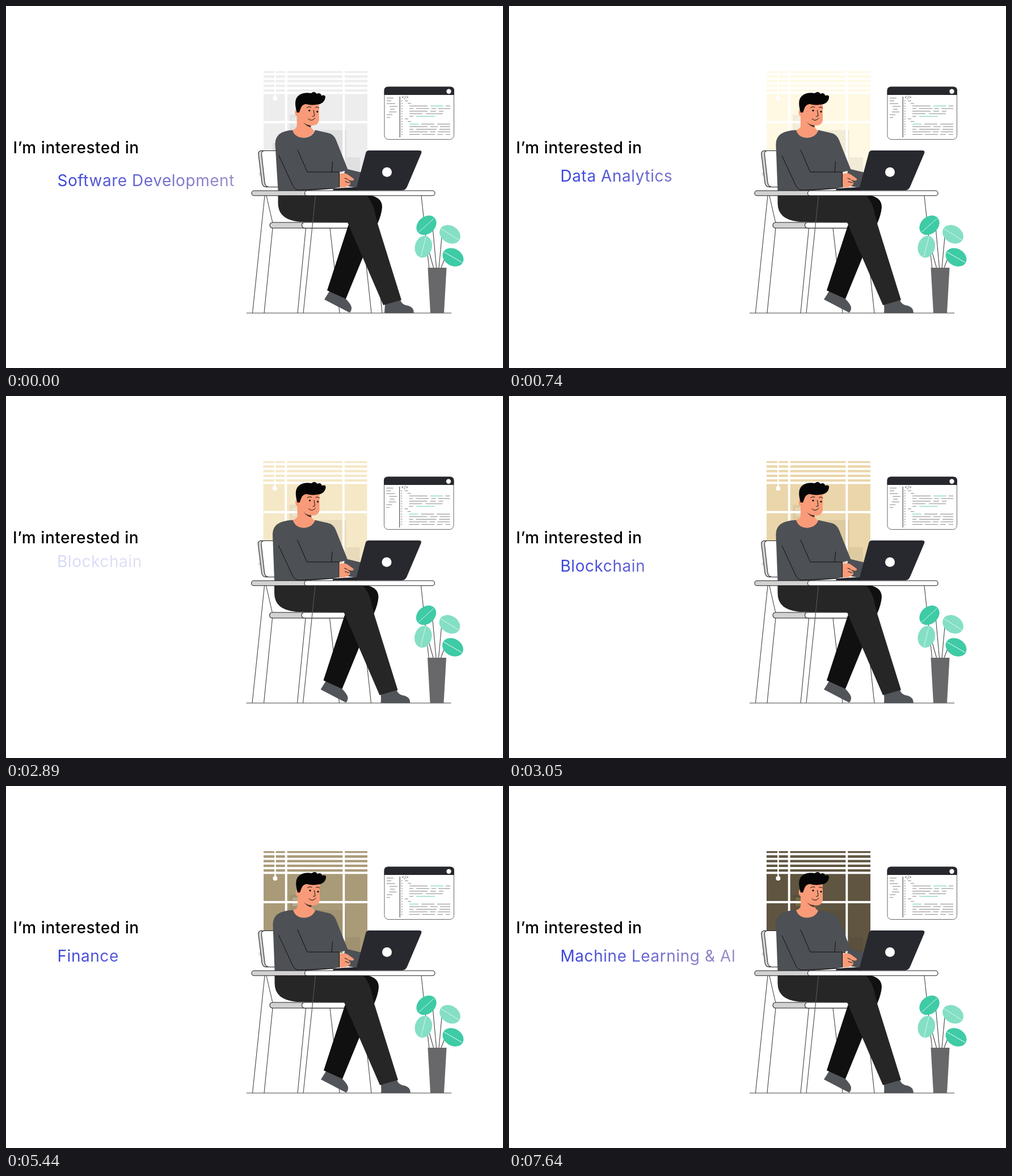
These frames come from a looping animation (876x639 px, 8000 ms). An HTML page:

```html
<!DOCTYPE html>
<html lang="en">
<head>
<meta charset="utf-8">
<title>Interests</title>
<style>
html, body { margin: 0; width: 100%; height: 100%; overflow: hidden; background: #fff }
svg { display: block; width: 876px; height: 639px }
text { font-family: Inter, "Open Sans", sans-serif; font-size: 28px; letter-spacing: .55px }
.line { fill: none; stroke: #444; stroke-width: 1.1 }
.thin { fill: none; stroke: #111; stroke-width: 1; stroke-linecap: round; stroke-linejoin: round }
.box { stroke: #222; stroke-width: 1.1 }
</style>
</head>
<body>
<svg viewBox="0 0 876 639">
<defs>
  <linearGradient id="ink" gradientUnits="userSpaceOnUse" x1="91" x2="404" y1="0" y2="0">
    <stop stop-color="#3944dc"/><stop offset="1" stop-color="#9d90c6"/>
  </linearGradient>
</defs>
<g id="stage">
  <text x="12.500" y="260.300" font-weight="500">I’m interested in</text>
  <g fill="url(#ink)"><text id="old" x="90.500"/><text id="next" x="90.500"/></g>

  <!-- window -->
  <rect x="445.500" y="294" width="4" height="5" fill="#ddd"/>
  <rect id="pane" x="454" y="115" width="183" height="180"/>
  <path opacity=".055" d="M500 192h16v27h84v76h-100zM600 267h24v28h-24zM470 242h24v50h-24z"/>
  <path id="lit" d="M505 197h12v5h-12zM505 207h12v5h-12z"/>
  <path fill="none" stroke="#fff" stroke-width="3.900" d="M454 120.200h183m-183 8.400h183m-183 8.200h183m-183 8.200h183M454 153.300h183M454 205h183M493.700 115v180M595.300 115v180"/>
  <path fill="none" stroke="#fff" stroke-width="2.500" d="M474.400 115v47"/>
  <circle cx="474.400" cy="163" r="4" fill="#fff"/>

  <!-- code panel -->
  <rect x="667" y="143" width="122.500" height="92.500" rx="7" fill="#fff" stroke="#666"/>
  <path fill="#27282d" d="M666.500 157v-8q0-6.500 6.500-6.500h110.500q6.500 0 6.500 6.500v8z"/>
  <circle cx="780.500" cy="150.700" r="4.200" fill="#fff"/>
  <path class="line" d="M694.200 160v72"/>
  <text x="697" y="164" style="font-size:7.500px;letter-spacing:0" fill="#444">&lt;/&gt;</text>
  <g id="code" fill="none" stroke-width=".8"></g>

  <!-- floor and chair -->
  <path class="line" d="M424 542H785M456 335L434.500 542M459 335L470 383M470 392L455 542M528.500 392L514 542M571 392L588 542M628 392L644 542M652 430L663 542M732 335L746 465"/>
  <path class="box" fill="#d2d2d2" d="M458 255.500H449q-5 1-4 7l6 49q1 8 8 8h10z"/>
  <path class="box" fill="#fff" d="M482 255.500H455q-5 0-4.500 7l5.500 49q1 8 8 8h18z"/>
  <rect class="box" x="465" y="382" width="160" height="10" rx="5" fill="#d2d2d2"/>
  <rect class="box" x="521.500" y="382" width="110" height="10" rx="5" fill="#fff"/>

  <g id="legs">
    <path fill="#515458" d="M565 502L592 516Q604 528 603 534Q602 541 599 541L555 518Z"/>
    <path fill="#515458" d="M662 526L689 519Q692 528 703 529Q713 532 713 542H661Z"/>
    <path fill="#101010" d="M630 335H640Q657 340 657 355Q656 368 649 384L622 446 593 517 560 502 597 388Z"/>
    <path fill="#262626" d="M473.500 334H629Q641 346 645 368L649 384 691 519 659 528 596 382 513 381Q473.500 378 473.500 348Z"/>
  </g>
  <path fill="none" stroke="#555" stroke-width="1.200" d="M545.500 335L524 542"/>

  <!-- body -->
  <path fill="#4d5055" d="M598 287L627 294 618 321 592 316Z"/>
  <path id="torso" fill="#4d5055"/>
  <path class="thin" d="M481 264L505 316Q508 323 515 325L577 322M514 254L531 293H587.500V320M575.500 275L574 293"/>
  <g id="head">
    <path fill="#f99b78" d="M514 190V212Q513 217 506 219Q510 232 525 232.500Q540 232 545 220Q539 217 538 209Z"/>
    <path fill="#49312d" d="M525 205Q531 211 539 210L538 214Q530 212 525 205Z"/>
    <path fill="#f99b78" d="M518 174L553 170V202Q551 211 541 211Q526 210 519 196Q511 196 510.500 188Q511 180 518 182Z"/>
    <path fill="#050505" d="M514 188Q508 168 515 160Q523 151 539 154Q545 149 549 155Q556 152 557 158Q565 156 564 162Q562 173 549 174Q539 176 530 173Q523 174 521 180L518 188Z"/>
    <circle cx="536" cy="184.500" r="1.500"/><circle cx="550" cy="186.500" r="1.500"/>
    <path class="thin" d="M531.500 179.500Q535 176.500 539 178.500M546.500 179Q550 177 553 180M543.500 184L545 194 541.500 195M534 199Q540 205 546 198"/>
  </g>

  <!-- table, laptop, hand -->
  <rect class="box" x="433" y="326" width="110" height="8.800" rx="4.400" fill="#d2d2d2"/>
  <rect class="box" x="526.500" y="326" width="229.500" height="8.800" rx="4.400" fill="#fff"/>
  <path fill="#222328" d="M577 322.500Q597 320 620 320V325.500H576Z"/>
  <path fill="#f99b78" d="M588 296Q597 294 602 297L613 305Q614 309 608 308L602 306 606 310Q609 315 604 317Q598 321 588 320Z"/>
  <path class="thin" stroke-width=".7" d="M602 306L597 304M605 312L598 310"/>
  <path fill="#28292f" d="M640 255H728Q734 255 732 260L707 319Q704 325.500 698 325.500H616.500L634 260Q635 255 640 255Z"/>
  <circle cx="671.500" cy="293.300" r="8.500" fill="#fff"/>

  <!-- plant -->
  <path class="line" d="M763 463L768 408M758.500 462L752.500 395M753.500 462L746 435M767 462L773 446"/>
  <path fill="#68686a" d="M743.500 462H776.500L772 542H748Z"/>
  <g id="leaves"></g>
</g>
</svg>
<script>
const $ = id => document.getElementById(id);
const words = ["Software Development", "Data Analytics", "Blockchain", "Finance", "Machine Learning & AI"];
const tints = [[237, 237, 237], [255, 249, 227], [234, 214, 170], [169, 154, 120], [95, 85, 65]];
const changes = [
  [500, 580, 660, 740],
  [2740, 2810, 2890, 2970, 3050],
  [5040, 5120, 5200, 5280, 5440],
  [7340, 7410, 7490, 7570, 7640]
];
const clamp = v => Math.max(0, Math.min(1, v));

// code rows: each pair is a dash and the gap after it; G marks green
const dark = [], green = [];
const row = (x, y, spec) => spec.split(" ").forEach(part => {
  const [len, gap] = part.replace("G", "").split(",");
  (part[0] === "G" ? green : dark).push(`M${x} ${y}h${len}`);
  x += +len + +(gap || 0);
});
["12", "8", "15", "14", "8", "13", "10", "6"].forEach((len, i) =>
  row(671 + [0, 0, 0, 5, 6, 4, 0, 0][i], 162.5 + i * 4.9, len));
const rows = ["6", "6", "32,5 G23,4 8", "7,5 23,4 8,4 21", "32,5 10,5 8", "23,6 30", "7,5 G33",
  "6", "6", "G16,5 23,5 23", "32,5 13,4 18", "7,5 36,5 19", "32,4 10,4 22", "18,4 23,4 10,5 8"];
rows.forEach((spec, i) => {
  const y = 167.3 + i * 4.57;
  row(696.5, y, "2.5");
  row(spec === "6" ? (i % 7 ? 708 : 703) : 711, y, spec);
});
$("code").innerHTML = `<path stroke="#666" d="${dark.join("")}"/><path stroke="#3ec09c" d="${green.join("")}"/>`;

const leaf = (x, y, turn, fill) => `<g transform="translate(${x} ${y}) rotate(${turn})">
  <ellipse rx="19.5" ry="15" fill="${fill}"/><path d="M-18 0H18" stroke="#d8f5ec" stroke-width=".9"/></g>`;
$("leaves").innerHTML = leaf(741, 387, -42, "#3ecba5") + leaf(782.5, 403, 32, "#84dfc5") +
  leaf(735.8, 425, -76, "#84dfc5") + leaf(788, 443.5, 30, "#3ecba5");

function word(el, text, y, alpha) {
  el.textContent = text;
  el.setAttribute("y", 309.6 + y);
  el.setAttribute("opacity", alpha);
}

function pose(s) {
  const x = 470.5 + 4 * s, low = 473.5 + 6 * s;
  $("torso").setAttribute("d", `M507 219Q510 232 525 232.500Q540 232 545 219L567 224Q578 226 582 237L603 290 588 293V320L577 322.500Q545 326 515 326H${low}L${x} 245Q${x - 1} 220 507 219Z`);
  $("legs").setAttribute("transform", `translate(${6 * s} 0)`);
  $("head").setAttribute("transform", `translate(${-1.3 * s} 0)`);
}

function draw(t) {
  let i = 0;
  while (i < 3 && t >= changes[i + 1][0]) i++;
  const steps = changes[i];
  const p = steps.filter(at => t >= at).length / steps.length;
  const q = clamp((p - .2) / .8), ease = q * q * (3 - 2 * q);
  const [r, g, b] = tints[i].map((v, k) => v + (tints[i + 1][k] - v) * ease);

  word($("old"), words[i], (i ? 0 : 8) + 50 * p * p, 1 - clamp((p - .25) / .35));
  word($("next"), words[i + 1], -50 * (1 - p) ** 2, clamp(2 * p - 1));
  $("pane").setAttribute("fill", `rgb(${r},${g},${b})`);
  $("lit").setAttribute("fill", r < 160 ? "rgba(190,170,80,.3)" : "rgba(255,255,255,.22)");
  $("stage").setAttribute("transform", `translate(${p > 0 && p < 1 ? -.5 : 0} 0)`);
  pose(i ? 0 : 1 - ease);
}

const start = performance.now();
(function tick() {
  draw((performance.now() - start) % 8000);
  requestAnimationFrame(tick);
})();
</script>
</body>
</html>
```
